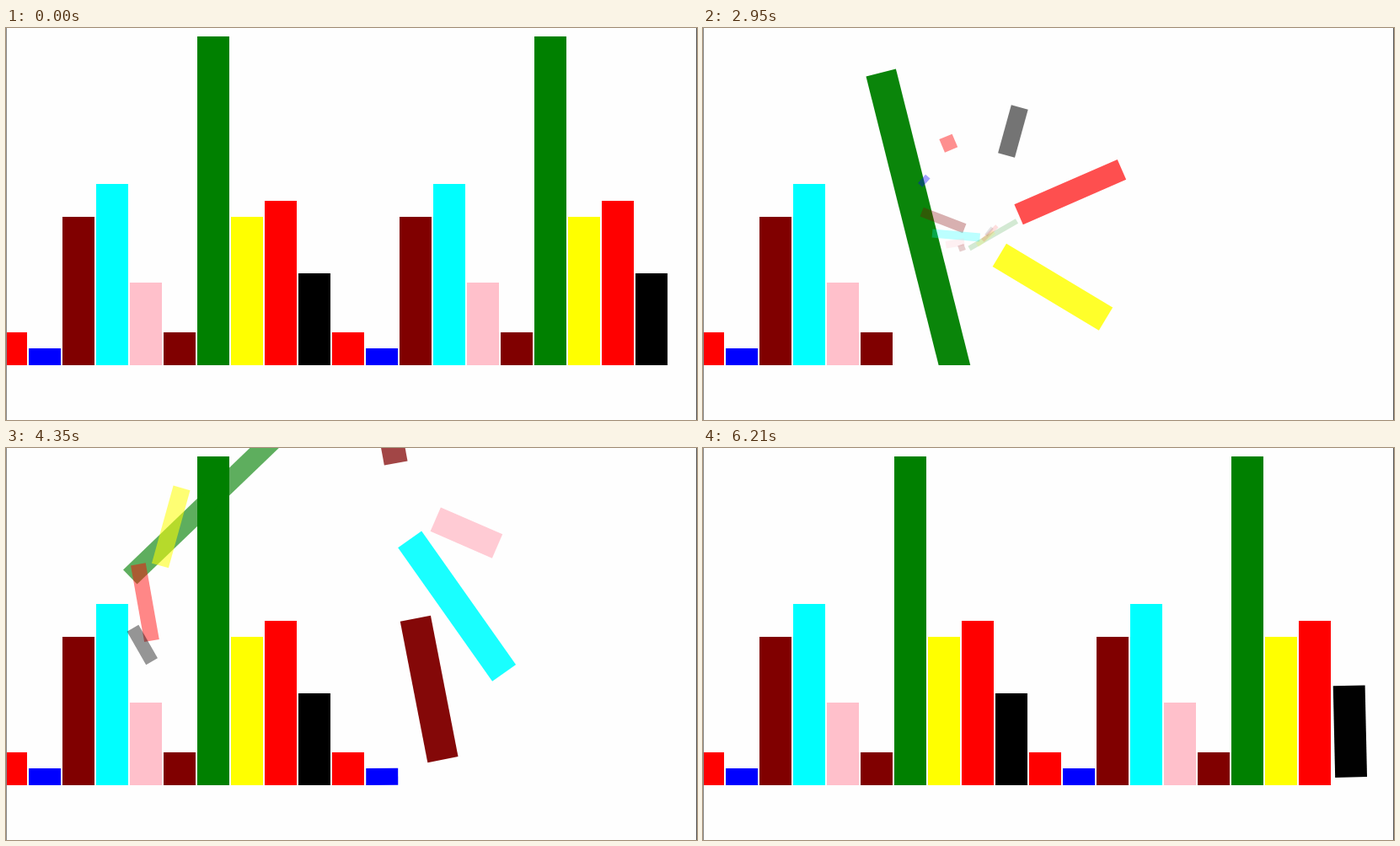
Recreate the animation shown at these times as an HTML page with a canvas. Size 820 by 465 pixels, loop 6.31 s.

```html
<!DOCTYPE html>
<html>
<head>
<meta charset="utf-8">
<style>
html, body { margin: 0; width: 100%; height: 100%; overflow: hidden; background: #fefefe; }
canvas { display: block; }
</style>
</head>
<body>
<canvas id="stage" width="820" height="465"></canvas>
<script>
const ctx = document.getElementById('stage').getContext('2d');
const LOOP = 6310, CLEAR = 660, START = 677, BASE = 400, COUNT = 20;
const colors = ['red', 'blue', 'maroon', 'cyan', 'pink', 'maroon', 'green', 'yellow', 'red', 'black'];
const values = [10, 5, 45, 55, 25, 10, 100, 45, 50, 28];

const lerp = (a, b, k) => a + (b - a) * k;
const smoothMax = (a, b, soft) => (a + b + Math.hypot(a - b, soft)) / 2;

// A sine ease whose phase runs slowly first, then faster
function ease(u) {
  const phase = smoothMax(1.45 * u - .242, 2.65 * u - 1.042, .06);
  return Math.sin(Math.min(Math.max(phase, 0), Math.PI / 2)) ** 2;
}

// Each bar grows, fades in and makes one turn around a drifting pivot
function drawBar(i, e) {
  const h = Math.round(values[i % 10] * 3.9);
  const px = lerp(0, 376, e), py = lerp(17, 183, e);
  ctx.save();
  ctx.translate(lerp(300, 0, e) + px, lerp(200, 0, e) + py);
  ctx.rotate(2 * Math.PI * (e - 1));
  ctx.translate(-px, -py);
  ctx.scale(e, e);
  ctx.globalAlpha = e;
  ctx.fillStyle = colors[i % 10];
  ctx.fillRect(40 * i - 13, BASE - h, 38, h);
  ctx.restore();
}

// Pointer path: time, x, y
const path = [[3070, 707, 407], [3190, 640, 410], [3460, 601, 362], [3710, 606, 413]];
const arrow = [[0, 0], [0, 19], [4, 15.5], [7, 22], [10.5, 20.5], [8, 14], [14, 13.5]];

function drawPointer(t) {
  const next = path.findIndex(p => p[0] > t);
  if (next < 1) return;
  const [t0, x0, y0] = path[next - 1], [t1, x1, y1] = path[next];
  const k = (t - t0) / (t1 - t0);
  const x = lerp(x0, x1, k), y = lerp(y0, y1, k);
  ctx.fillStyle = '#000';
  ctx.beginPath();
  arrow.forEach(([dx, dy]) => ctx.lineTo(x + dx, y + dy));
  ctx.fill();
}

function draw(t) {
  ctx.fillStyle = '#fefefe';
  ctx.fillRect(0, 0, 820, 465);
  ctx.save();
  ctx.beginPath();
  ctx.rect(1, 0, 818, BASE);
  ctx.clip();
  for (let i = 0; i < COUNT; i++) {
    const e = t < CLEAR ? 1 : ease((t - START) / (1000 + 250 * i));
    if (e > 0) drawBar(i, e);
  }
  ctx.restore();
  ctx.fillStyle = '#888';
  ctx.fillRect(0, 0, 1, 465);
  ctx.fillStyle = '#555';
  ctx.fillRect(819, 0, 1, 465);
  drawPointer(t);
}

const begin = performance.now();
function frame() {
  draw((performance.now() - begin) % LOOP);
  requestAnimationFrame(frame);
}
frame();
</script>
</body>
</html>
```
